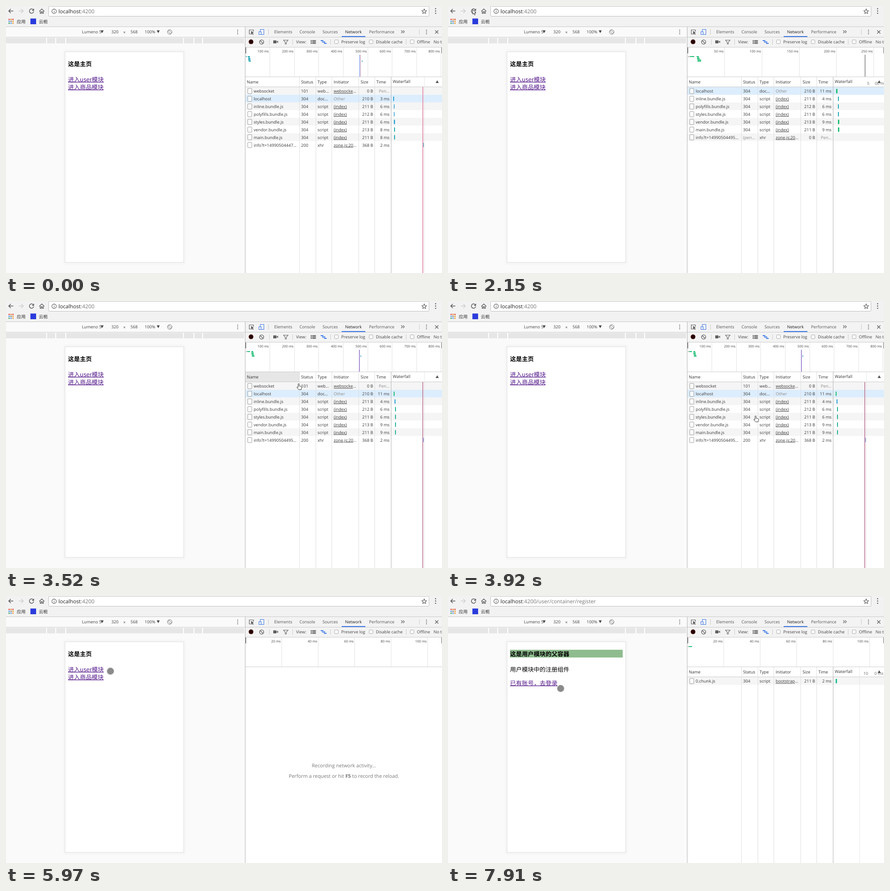
Write an HTML page that moves like this. It is 956 px wide and 586 px high and loops after 8000 ms.

```html
<!DOCTYPE html>
<html lang="zh">
<head>
<meta charset="utf-8">
<title>Lazy loading in the network panel</title>
<style>
html, body { margin: 0; width: 100%; height: 100%; overflow: hidden; background: #fff; }
svg { display: block; width: 100vw; height: 100vh; }
text { font-family: "Open Sans", "Noto Sans", sans-serif; text-rendering: geometricPrecision; white-space: pre; }
.cjk { font-family: "Noto Sans CJK SC", "Noto Sans CJK", sans-serif; }
.u { text-decoration: underline; text-decoration-skip-ink: none; }
.b { font-weight: 700; }
.end { text-anchor: end; }
.mid { text-anchor: middle; }
</style>
</head>
<body>
<svg viewBox="0 0 956 586"><g id="scene"></g><g id="cursor"></g></svg>
<script>
const LOOP = 8000;
const scene = document.getElementById('scene');
const cursor = document.getElementById('cursor');

const rect = (x, y, w, h, fill, stroke = 'none') =>
  `<rect x="${x}" y="${y}" width="${w}" height="${h}" fill="${fill}" stroke="${stroke}"/>`;
const circle = (x, y, r, fill, stroke = 'none', w = 1) =>
  `<circle cx="${x}" cy="${y}" r="${r}" fill="${fill}" stroke="${stroke}" stroke-width="${w}"/>`;
const path = (d, stroke, w = 1, fill = 'none') =>
  `<path d="${d}" fill="${fill}" stroke="${stroke}" stroke-width="${w}"/>`;
const text = (x, y, s, fill = '#444', size = 9.2, cls = '') =>
  `<text x="${x}" y="${y}" fill="${fill}" font-size="${size}" class="${cls}">${s}</text>`;
const each = (list, fn) => list.map(fn).join('');
const down = (x, y) => path(`M${x} ${y}h6.6l-3.3 6z`, 'none', 0, '#444');
const dots = (x, y, gap, r) => each([-1, 0, 1], i => circle(x, y + i * gap, r, '#5a5a5a'));
const rule = (x, y, h, c = '#ccc') => rect(x, y, 1, h, c);
// the ellipsis of a shortened link is not underlined
const link = s => s.replace(/^[^…]+/, '<tspan class="u">$&</tspan>');

function star(cx, cy) {
  const pts = Array.from({ length: 10 }, (_, i) => {
    const r = i % 2 ? 2.5 : 5.5, a = i * Math.PI / 5;
    return (cx + r * Math.sin(a)).toFixed(2) + ' ' + (cy - r * Math.cos(a)).toFixed(2);
  });
  return path('M' + pts.join('L') + 'Z', '#555', 1.1);
}

// ---- request data: name, status, type, initiator, size, time ----
const bundles = [['inline', 211], ['polyfills', 212], ['styles', 211], ['vendor', 213], ['main', 211]];
const scripts = times => bundles.map(([n, size], i) =>
  [n + '.bundle.js', 304, 'script', '(index)', size + ' B', times[i] + ' ms']);
const socket = ['websocket', 101, 'web…', 'websocke…', '0 B', 'Pen…'];
const doc = time => ['localhost', 304, 'doc…', 'Other', '210 B', time];
const info = (id, status, size, time) => [`info?t=${id}…`, status, 'xhr', 'zone.js:20…', size, time];
const reloaded = [doc('11 ms'), ...scripts([4, 6, 6, 9, 9])];

const BLUE = '#2a9fd6', TEAL = '#21a5b5', GREEN = '#1fbf75', SEA = '#22b096';
// bars: waterfall [x, width, colour] per row; mini: overview [x, y, width, colour]
const logs = {
  before: {
    step: 53.6, unit: 100, grid: 917,
    rows: [socket, doc('3 ms'), ...scripts([6, 6, 6, 8, 8]), info('14990504447', 200, '368 B', '2 ms')],
    bars: [0, [849, 2, BLUE], [850.5, 1.5, BLUE], [850.5, 1.5, BLUE], [850.5, 2.5, BLUE],
      [851, 2, TEAL], [851, 2, TEAL], [914, 2, TEAL]],
    mini: [[526, 110, 2, TEAL], [530, 110, 5, TEAL], [531, 112.5, 4, TEAL], [531, 115, 5, TEAL],
      [531, 117.5, 5, TEAL], [532, 120, 5, TEAL], [780, 120, 2, TEAL]],
    marks: [[775, 1, '#5b78e0'], [777, 1, '#d9a0b4']], lines: [[913, 2, '#e597b4']],
  },
  loading: {
    step: 81.7, unit: 50, labels: [[919, '5'], [936, '00 ms']],
    rows: [...reloaded, info('14990504495', '(pen…', '0 B', 'Pen…')],
    bars: [[851, 3, GREEN], [855, 2, TEAL], [855, 2, TEAL], [855, 2, TEAL], [855, 3, GREEN], [855, 3, GREEN]],
    mini: [[526, 110, 5, '#bbb'], [531, 110, 9, GREEN], [545, 110, 5, GREEN], [546, 112.5, 5, GREEN],
      [546, 115, 6, GREEN], [547, 117.5, 8, GREEN], [547, 120, 8, GREEN]],
    marks: [[913.5, 2, '#999']],
  },
  after: {
    step: 53.6, unit: 100, grid: 917,
    rows: [socket, ...reloaded, info('14990504495', 200, '368 B', '2 ms')],
    bars: [0, [850, 2, GREEN], [852, 2, BLUE], [853, 2, SEA], [853, 2, SEA],
      [853, 2, SEA], [853, 2, SEA], [914, 2, '#4a86dc']],
    mini: [[526, 110, 3, '#bbb'], [529, 110, 6, GREEN], [538, 110, 4, GREEN], [538, 112.5, 5, GREEN],
      [538, 115, 5, GREEN], [539, 117.5, 5, GREEN], [539, 120, 6, GREEN], [777, 120, 2, BLUE]],
    marks: [[774, 1, '#7d78dc'], [775, 1, '#d3a0cc']], lines: [[913, 1, '#a87a9c'], [914, 1, '#e8a0b2']],
  },
  empty: { step: 79.8, unit: 20, rows: [], bars: [], mini: [], marks: [] },
  chunk: {
    step: 79.8, unit: 20, grid: 902, labels: [[911, '10'], [935, '0 ms']],
    rows: [['0.chunk.js', 304, 'script', 'bootstrap…', '211 B', '2 ms']],
    bars: [[850, 3, '#1fbf95']],
    mini: [[526, 110, 2, '#bbb'], [528, 110, 7, GREEN]], marks: [],
  },
};

// ---- browser frame ----
function browser(s) {
  const ink = '#5a5a5a';
  const apps = ['#e2574c', '#e8853d', '#e2574c', '#5c9ded', '#8a8a8a', '#e8a33d', '#48a867', '#5c9ded', '#e8a33d'];
  return rect(0, 0, 956, 46, '#f2f2f2')
    + (s.press ? circle(56.5, 11.5, 12.5, '#d2d2d2') : '')
    + path('M16 11H6M10.5 6.5L6 11L10.5 15.5', ink, 1.5)
    + path('M28 11H38M33.5 6.5L38 11L33.5 15.5', '#cfcfcf', 1.5)
    + path('M59.5 7.7A4.8 4.8 0 1 0 60.8 12.2', ink, 1.5) + path('M61.5 5.5v5h-5z', 'none', 0, ink)
    + path('M73 11.8L78.5 6.3L84 11.8M75 11V16H77.4V12.5H79.6V16H82V11', ink, 1.3)
    + `<rect x="93.5" y=".5" width="834" height="22" rx="2" fill="#fff" stroke="#bdbdbd"/>`
    + circle(105.5, 11.5, 4.9, 'none', ink, 1.1) + rect(105, 10.8, 1.1, 3.4, ink) + rect(105, 8.6, 1.1, 1.2, ink)
    + text(115, 15.6, `localhost<tspan fill="#777">:4200${s.user ? '/user/container/register' : ''}</tspan>`, '#222', 11.7)
    + star(917, 12) + dots(942, 11, 5, 1.3)
    + each(apps, (c, i) => rect(5.5 + i % 3 * 4.2, 28 + (i / 3 | 0) * 4.2, 2.8, 2.8, c))
    + text(23.5, 38, '应用', '#333', 9.8, 'cjk')
    + rect(53.5, 27.5, 12.5, 12.5, '#2a3bdc')
    + text(72, 38, '云栀', '#333', 9.8, 'cjk')
    + rect(0, 45, 956, 1, '#c8c8c8');
}

// ---- device preview ----
function device(s) {
  const page = s.user
    ? rect(136, 118, 247, 17, '#8fbc8f')
      + text(136, 132, '这是用户模块的父容器', '#000', 13, 'cjk b')
      + text(136, 165.7, '用户模块中的注册组件', '#000', 13, 'cjk')
      + text(136, 195.5, '已有账号，去登录', '#551a8b', 13, 'cjk u')
    : text(136, 132, '这是主页', '#000', 13, 'cjk b')
      + text(136, 165.5, '进入user模块', '#551a8b', 13, 'cjk u')
      + text(136, 182.5, '进入商品模块', '#551a8b', 13, 'cjk u');
  return rect(0, 46, 524, 540, '#fafafa') + rect(0, 68, 524, 1, '#ccc')
    + text(166.5, 60.4, 'Lumeno 5') + down(207.5, 53.5)
    + text(231, 60.4, '320') + text(257, 61, '×') + text(273, 60.4, '568')
    + text(304, 60.4, '100%') + down(330.5, 53.5)
    + circle(359, 57, 5, 'none', '#777') + path('M357.5 53L363 58.5L360.5 61L355 55.5Z', '#777', 1, '#fafafa')
    + dots(508, 57, 4, 1.1)
    + rect(0, 70, 522, 12, '#e6e6e6') + each([88, 108, 130, 388, 411, 430], x => rect(x, 70, 2, 12, '#fff'))
    + each([6, 4, 2], r => `<rect x="${130 - r}" y="${101 - r}" width="${259 + 2 * r}" height="${462 + 2 * r}" rx="${r}" fill="#000" opacity=".008"/>`)
    + rect(129.5, 100.5, 260, 462, '#fff', '#e0e0e0') + page;
}

// ---- developer tools ----
function toolbar() {
  const ink = '#5f5f5f', blue = '#3b78e7';
  const tabs = [[588, 'Elements'], [643.5, 'Console'], [694, 'Sources'], [743.5, 'Network'], [796, 'Performance']];
  const checks = [[720.5, 'Preserve log'], [796.5, 'Disable cache'], [886.5, 'Offline']];
  return rect(524, 46, 432, 540, '#fff') + rect(525, 46, 431, 44, '#f3f3f3')
    + path('M541 61.5H533.5V52.5H542.5V56', ink, 1.2) + path('M537 55l6.5 3-2.7 1 2.3 3-1.3 1-2.2-3-1.8 2z', 'none', 0, ink)
    + rect(557.5, 51.5, 8, 11, 'none', blue) + rect(554.5, 56.5, 5, 6, '#f3f3f3', blue)
    + rule(575, 51, 12)
    + each(tabs, ([x, s]) => text(x, 60.4, s, s === 'Network' ? '#222' : '#555'))
    + rect(525, 68, 431, 1, '#ccc') + rect(736, 66, 52, 2, blue)
    + path('M866.5 53.5l3 3-3 3M870.5 53.5l3 3-3 3', ink, 1.2)
    + rule(906, 51, 12) + dots(922, 57, 4, 1.1) + path('M941 53.5l7 7M948 53.5l-7 7', ink, 1.4)
    + circle(537.3, 78.6, 5.9, '#ecd2ce') + circle(537.3, 78.6, 5, '#280000')
    + circle(560.5, 79, 4.6, 'none', ink, 1.4) + path('M557.4 75.9l6.2 6.2', ink, 1.4)
    + rule(577, 73, 12)
    + rect(586, 75.5, 7, 6.5, ink) + path('M593 78.5l3.5-2.5v5.5z', 'none', 0, ink)
    + path('M608.5 75h10l-3.8 4.5v4h-2.4v-4z', ink, 1.1)
    + rule(628, 73, 12) + text(636, 82.3, 'View:')
    + each([75, 78, 81], y => rect(668, y, 2.5, 2, ink) + rect(671.5, y, 8, 2, ink))
    + rect(690, 75, 6, 2, blue) + rect(693, 78, 7, 2, blue) + rect(697, 81, 6, 2, blue)
    + rule(711, 73, 12) + rule(877, 73, 12)
    + each(checks, ([x, s]) => `<rect x="${x}" y="74.5" width="8" height="8" rx="1" fill="#fdfdfd" stroke="#aaa"/>` + text(x + 14.5, 82.3, s))
    + text(937.5, 82.3, 'No throttling')
    + rect(525, 90, 431, 1, '#ccc');
}

function overview(log) {
  let out = '';
  for (let i = 1; 525 + i * log.step < 956; i++) {
    const x = Math.round(524.5 + i * log.step);
    out += rule(x, 91, 64, '#e2e2e2') + text(x - 1.7, 102, i * log.unit + ' ms', '#444', 7.4, 'end');
  }
  return out + rect(525, 91, 1.5, 13, '#666') + rect(955, 91, 1, 13, '#666')
    + each(log.mini, ([x, y, w, c]) => rect(x, y, w, 2, c))
    + each(log.marks, ([x, w, c]) => rect(x, 107, w, 48, c))
    + rect(525, 155, 431, 1, '#ccc');
}

const columns = [[528, 'Name'], [647, 'Status'], [683, 'Type'], [718.5, 'Initiator'], [777.5, 'Size'], [812, 'Time']];

function row(r, i, bar) {
  const y = 178 + i * 16.9, base = y + 12.3, [name, status, type, init, size, time] = r;
  const selected = name === 'localhost', grey = '#8a8a8a', ink = '#3a3a3a';
  const dim = s => /pen/i.test(s) ? grey : ink;
  return rect(525, y, 431, 16.9, selected ? '#dcedfd' : i % 2 ? '#fff' : '#f5f5f5')
    + `<rect x="530" y="${y + 3}" width="9" height="11.5" rx="1" fill="#fff" fill-opacity=".7" stroke="#999"/>`
    + text(543, base, name, ink) + text(647, base, status, dim(String(status))) + text(683, base, type, ink)
    + (init === 'Other' ? text(718.5, base, init, grey) : text(718.5, base, link(init), ink))
    + text(805, base, size, ink, 9.2, 'end') + text(841, base, time, dim(time), 9.2, 'end')
    + (bar ? rect(bar[0], y + 4, bar[1], 9.5, bar[2]) : '');
}

function table(log, count, hover) {
  if (!log.rows.length) {
    return text(741, 376, 'Recording network activity…', '#777', 10.8, 'mid')
      + text(741, 398.7, 'Perform a request or hit <tspan class="b">F5</tspan> to record the reload.', '#777', 10.8, 'mid');
  }
  return (hover ? rect(525, 156, 118, 21, '#e6e6e6') : '')
    + each(columns, ([x, s]) => text(x, 170, s, '#333'))
    + text(848, 169.3, 'Waterfall', '#333')
    + each(log.labels || [], ([x, s]) => text(x, 172.5, s, '#666', 8.8))
    + path('M942 169h7l-3.5-6z', 'none', 0, '#555')
    + rect(525, 177, 431, 1, '#ccc')
    + each(log.rows.slice(0, count), (r, i) => row(r, i, log.bars[i]))
    + each([643, 679, 714, 773, 808], x => rule(x, 156, 430, '#dedede'))
    + rule(844, 156, 430, '#b5b5b5')
    + (log.grid ? rule(log.grid, 156, 430, '#e6e6e6') : '')
    + each(log.lines || [], ([x, w, c]) => rect(x, 178, w, 408, c));
}

// ---- timeline ----
function stateAt(t, x, y) {
  const log = t < 1760 ? 'before' : t < 2300 ? 'loading' : t < 5000 ? 'after' : t < 6690 ? 'empty' : 'chunk';
  return {
    log,
    count: log !== 'loading' ? 8 : t < 1900 ? 1 : t < 2150 ? 6 : 7,
    user: t >= 6600,
    press: t >= 1610 && t < 1900,
    hover: x > 525 && x < 643 && y > 156 && y < 183,
  };
}

// pointer stops: time, x, y
const stops = [[180, 864, 588], [890, 54, 25], [990, 54, 25], [1220, 72, 17], [1450, 54, 8], [2300, 54, 8],
  [2640, 170, 250], [2830, 170, 250], [3520, 642, 181], [3590, 646, 180], [3680, 646, 180], [4080, 690, 290],
  [4450, 620, 140], [4520, 620, 140], [4920, 566, 90], [5070, 561, 75], [5450, 561, 75], [5970, 229, 165],
  [6080, 216, 174], [6200, 211, 165], [6830, 211, 165], [7300, 262, 220], [7550, 256, 212], [7640, 256, 212],
  [7910, 247, 203], [8001, 247, 203]];

function pointerAt(t) {
  if (t < stops[0][0]) return [864, 640];
  const i = stops.findIndex(s => s[0] > t);
  const [t0, x0, y0] = stops[i - 1], [t1, x1, y1] = stops[i];
  const p = (t - t0) / (t1 - t0), k = p * p * (3 - 2 * p);
  return [x0 + (x1 - x0) * k, y0 + (y1 - y0) * k];
}

const shapes = {
  arrow: path('M0 0V10L2.4 7.9L4 11.8L5.8 11L4.2 7.3H7.3Z', '#222', 0.9, '#fff'),
  hand: path('M-1.5 1Q-.5-.6 .8 1V5.5L5 6.3Q6.6 6.8 6.3 9L5.4 13.5H-.2L-4.4 8.6Q-4.2 6.8-1.5 8.6Z', '#222', 0.9, '#fff'),
  touch: circle(0, 0, 8.3, '#ccc') + circle(0, 0, 7.2, '#8a8a8a'),
};

function shapeAt(x, y, log) {
  if (x > 130 && x < 389 && y > 100 && y < 562) return 'touch';
  return x > 525 && y > 156 && y < 314 && log !== 'empty' ? 'hand' : 'arrow';
}

let shown = '';
function draw(now) {
  const t = now % LOOP;
  const [x, y] = pointerAt(t);
  const s = stateAt(t, x, y), key = JSON.stringify(s);
  if (key !== shown) {
    const log = logs[s.log];
    scene.innerHTML = browser(s) + device(s) + toolbar() + overview(log)
      + table(log, s.count, s.hover) + rule(524, 46, 540, '#b5b5b5');
    shown = key;
  }
  cursor.innerHTML = shapes[shapeAt(x, y, s.log)];
  cursor.setAttribute('transform', `translate(${x.toFixed(1)} ${y.toFixed(1)})`);
  requestAnimationFrame(draw);
}
requestAnimationFrame(draw);
</script>
</body>
</html>
```
